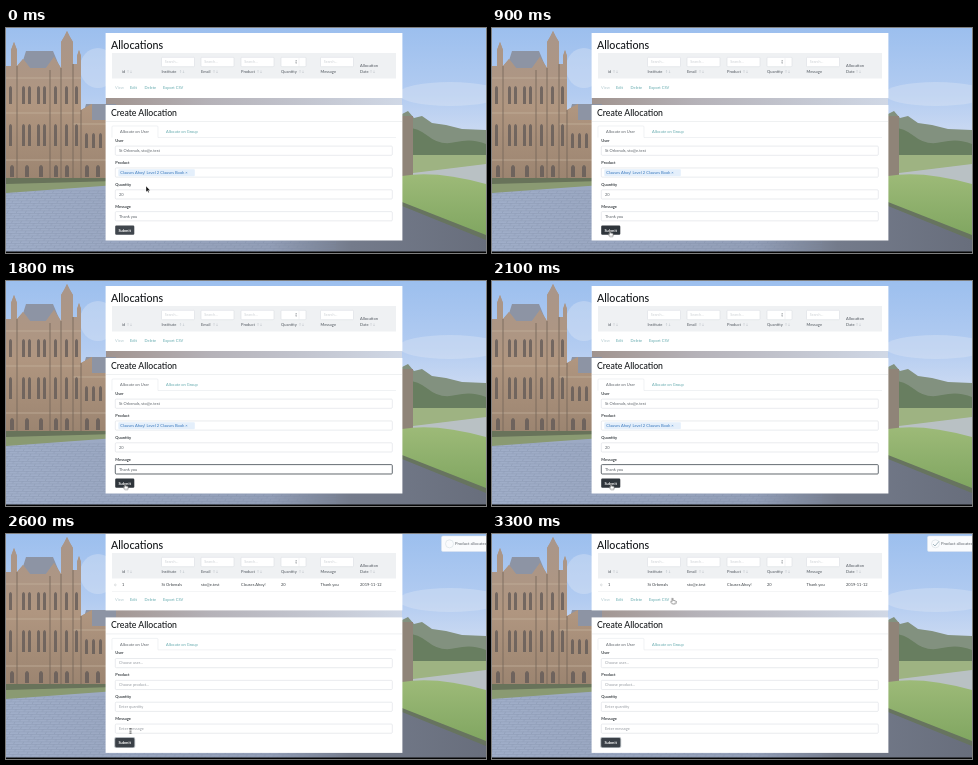
An HTML page for the animation above (3.4 s loop, 480 px wide and 225 px high).

```html
<!DOCTYPE html>
<html lang="en">
<head>
<meta charset="utf-8">
<title>Allocations</title>
<style>
  html, body { margin: 0; width: 100%; height: 100%; overflow: hidden; background: #000; }
  svg { display: block; width: 480px; height: 225px; }
  text { font: 4px Lato, "Open Sans", sans-serif; fill: #5d6369; }
  .title { font-size: 10.7px; font-weight: 500; fill: #16191c; }
  .subtitle { font-size: 8.7px; font-weight: 500; fill: #16191c; }
  .head { font-weight: 600; fill: #666c73; }
  .label { font-weight: 700; fill: #3b4045; }
  .hint { font-size: 3.9px; fill: #989da3; }
  .faint { font-size: 3.7px; fill: #cdd1d5; }
  .link { fill: #62a9ad; }
  .off { fill: #b5cbd0; }
  .row text { fill: #3b4045; }
  .field { fill: #fff; stroke: #dadee2; stroke-width: .6; }
  .anim { animation: 3.4s step-end infinite; }

  /* the new row pushes the form down while the page scrolls a little */
  .up { animation-name: up; }
  .down { animation-name: down; }
  .grow { animation-name: grow; }
  .late { animation-name: late; }
  .filled { animation-name: filled; }
  .empty, .glow { animation-name: empty; }
  .focus { animation-name: focus; }
  .hover { animation-name: hover; }
  .tick { stroke-dasharray: 9; animation-name: tick; }
  .cursor { animation-name: cursor; }
  .arrow { animation-name: arrow; }
  .hand { animation-name: hand; }
  .beam { animation-name: beam; }

  @keyframes up { 0% { transform: none; } 76.45%, 100% { transform: translateY(-6px); } }
  @keyframes down { 0% { transform: none; } 76.45%, 100% { transform: translateY(6.4px); } }
  @keyframes grow { 0% { height: 65px; } 76.45%, 100% { height: 77.4px; } }
  @keyframes late { 0% { visibility: hidden; } 76.45%, 100% { visibility: visible; } }
  @keyframes filled { 0% { visibility: visible; } 70.57%, 100% { visibility: hidden; } }
  @keyframes empty { 0% { visibility: hidden; } 70.57%, 100% { visibility: visible; } }
  @keyframes focus { 0% { visibility: hidden; } 49.98% { visibility: visible; } 70.57%, 100% { visibility: hidden; } }
  @keyframes hover { 0% { fill: #40464d; } 8.8% { fill: #2f353b; } 76.45%, 100% { fill: #3a4047; } }
  @keyframes tick {
    0% { stroke-dashoffset: 9; }
    76.45% { stroke-dashoffset: 9; animation-timing-function: steps(4); }
    88.22%, 100% { stroke-dashoffset: 0; }
  }
  @keyframes cursor {
    0% { transform: translate(140px, 158px); animation-timing-function: steps(3); }
    8.8% { transform: translate(119px, 197.5px); animation-timing-function: steps(2); }
    14.68% { transform: translate(118px, 202.5px); }
    49.98% { transform: translate(119px, 202.5px); }
    76.45% { transform: translate(124.5px, 197px); animation-timing-function: steps(4); }
    88.22% { transform: translate(140px, 157px); animation-timing-function: steps(3); }
    97.04%, 100% { transform: translate(180.5px, 64px); }
  }
  @keyframes arrow {
    0% { visibility: visible; } 5.86% { visibility: hidden; }
    79.39% { visibility: visible; } 97.04%, 100% { visibility: hidden; }
  }
  @keyframes hand {
    0% { visibility: hidden; } 8.8% { visibility: visible; }
    76.45% { visibility: hidden; } 97.04%, 100% { visibility: visible; }
  }
  @keyframes beam {
    0% { visibility: hidden; } 5.86% { visibility: visible; } 8.8% { visibility: hidden; }
    76.45% { visibility: visible; } 79.39%, 100% { visibility: hidden; }
  }
</style>
</head>
<body>
<svg viewBox="0 0 480 225">
  <defs>
    <linearGradient id="sky" x2="0" y2="1">
      <stop offset="0" stop-color="#9cbfee"/><stop offset=".3" stop-color="#b3ccf1"/><stop offset=".5" stop-color="#cfdcf2"/>
    </linearGradient>
    <linearGradient id="stone" x2="0" y2="1">
      <stop offset="0" stop-color="#a9968a"/><stop offset=".5" stop-color="#b09680"/><stop offset="1" stop-color="#9b8470"/>
    </linearGradient>
    <linearGradient id="wings">
      <stop offset="0" stop-color="#a0938e"/><stop offset=".35" stop-color="#b5b2b8"/><stop offset="1" stop-color="#d0d8e6"/>
    </linearGradient>
    <linearGradient id="lawn" x2="0" y2="1">
      <stop offset="0" stop-color="#9dba78"/><stop offset="1" stop-color="#7fa560"/>
    </linearGradient>
    <linearGradient id="path">
      <stop offset="0" stop-color="#a0aec9"/><stop offset=".55" stop-color="#939fb8"/><stop offset=".72" stop-color="#747b8b"/><stop offset="1" stop-color="#686e7c"/>
    </linearGradient>
    <pattern id="cobbles" width="9" height="5" patternUnits="userSpaceOnUse" patternTransform="skewX(-25)">
      <path d="M0 .4H9M2 0V2.5M0 2.9H9M6.5 2.5V5" stroke="#7886a0" stroke-width=".6" opacity=".45"/>
    </pattern>
    <pattern id="courses" width="7" height="4" patternUnits="userSpaceOnUse">
      <path d="M0 .5H7M2 0V2M5 2V4" stroke="#6d5946" stroke-width=".5" opacity=".25"/>
    </pattern>
  </defs>

  <rect width="480" height="225" fill="url(#sky)"/>
  <g fill="#e3eaf6" opacity=".35">
    <ellipse cx="444" cy="66" rx="52" ry="12"/><ellipse cx="92" cy="40" rx="18" ry="20"/>
  </g>

  <!-- hall -->
  <rect x="100" y="69" width="296" height="16" fill="url(#wings)"/>
  <path d="M14 42L20 23H47L55 42ZM74 98L80 76H110V98Z" fill="#8d94a4"/>
  <path id="hall" d="M0 38H5V22L8 14L11 22V38L17 31L24 40H40L48 29L55 40V14L58 9L61 3L64 9L67 14V36H71V28L73 22L75 28V82L86 76V92H110V153H0Z" fill="url(#stone)"/>
  <use href="#hall" style="fill:url(#courses)"/>
  <path d="M0 50H75M0 85H75M67 96H110M0 132H110" stroke="#c2b09a" stroke-width="1.2" opacity=".8"/>
  <path d="M11 38V152M44 42V152M55 40V152M67 36V152M75 82V152" stroke="#75665a" stroke-width="1.4" opacity=".6"/>
  <g id="windows" fill="#5f5856" opacity=".75"/>

  <!-- grounds -->
  <rect y="150" width="480" height="75" fill="url(#path)"/>
  <rect y="162" width="330" height="63" fill="url(#cobbles)"/>
  <path d="M0 150H110V157L0 165Z" fill="#8a9a72"/>
  <path d="M0 150H110V153L0 156Z" fill="#68735a"/>
  <rect x="396" y="118" width="84" height="42" fill="#b9c1c4"/>
  <path d="M396 86L402 83L408 90L416 88L426 95L440 97L456 101L480 102V126H396Z" fill="#82917f"/>
  <path d="M396 100Q410 98 422 108T450 114T480 116V128H396Z" fill="#687e60"/>
  <path d="M396 88H407V148H396Z" fill="#8f8478"/>
  <path d="M407 127H480V136L407 145Z" fill="#9eb382"/>
  <path d="M396 148Q430 142 480 156V210L396 176Z" fill="url(#lawn)"/>
  <path d="M396 174L480 207V212L396 178Z" fill="#67745f"/>
  <rect y="223.5" width="480" height="1.5" fill="#050505"/>

  <!-- table panel -->
  <g class="anim up">
    <rect class="anim grow" x="99.6" y="5" width="296.8" height="65" fill="#fff"/>
    <text class="title" x="105" y="20.6">Allocations</text>
    <rect x="106" y="25" width="284" height="25.5" fill="#eff1f3"/>
    <g id="heads"></g>
  </g>
  <g class="anim late row" id="row"></g>
  <g class="anim down">
    <text class="link off" x="109" y="60.6">View</text>
    <text class="link" x="124" y="60.6">Edit</text>
    <text class="link" x="138.5" y="60.6">Delete</text>
    <text class="link" x="157" y="60.6">Export CSV</text>

    <!-- form panel -->
    <rect x="99.6" y="77" width="296.8" height="135.5" fill="#fff"/>
    <text class="subtitle" x="105" y="87.6">Create Allocation</text>
    <path d="M100 93.5H396" stroke="#e8ebed" stroke-width=".7"/>
    <path d="M106 109.5V99Q106 98 107 98H151Q152 98 152 99V109.5H390" fill="none" stroke="#e6e9ec" stroke-width=".6"/>
    <text x="114" y="105.3">Allocate on User</text>
    <text class="link" x="160" y="105.3">Allocate on Group</text>
    <g id="fields"></g>
    <rect class="anim focus" x="109.3" y="183.6" width="277" height="9.4" rx="1" fill="none" stroke="#5c6268" stroke-width=".9"/>
    <rect class="anim glow" x="108.3" y="196.7" width="20.9" height="11" rx="1.8" fill="#b3b8bd"/>
    <rect class="anim hover" x="109.2" y="197.6" width="19.1" height="9.2" rx="1.1"/>
    <text x="112.4" y="203.7" style="fill:#fff;font-weight:700">Submit</text>
  </g>

  <!-- toast -->
  <g class="anim late">
    <rect x="435.5" y="2" width="50" height="15.5" rx="1.5" fill="#fafbfd" stroke="#dfe5ee" stroke-width=".5"/>
    <circle cx="443.5" cy="9.8" r="4" fill="none" stroke="#d9e1e5" stroke-width=".7"/>
    <path class="anim tick" d="M441 10L443 12L447 7.4" fill="none" stroke="#93a9b3" stroke-width=".8"/>
    <text x="449" y="11.3" style="font-size:4.2px">Product allocated</text>
  </g>

  <g class="anim cursor" stroke-linejoin="round">
    <path class="anim arrow" d="M0 0V6L1.4 4.8L2.3 6.7L3.2 6.3L2.4 4.4H4.2Z" fill="#111" stroke="#fff" stroke-width=".4"/>
    <path class="anim hand" d="M-.6 .4Q0 -.4 .5 .4V2.3L3 2.9Q3.5 3.1 3.3 4L2.8 6H-.2L-1.9 3.8Q-1.6 3 -.6 3.7Z" fill="#fff" stroke="#3c3c3c" stroke-width=".5"/>
    <path class="anim beam" d="M-1.2 -2.7Q0 -2.7 0 -2Q0 -2.7 1.2 -2.7M0 -2V2M-1.2 2.7Q0 2.7 0 2Q0 2.7 1.2 2.7M-.6 .8H.6" fill="none" stroke="#333" stroke-width=".6"/>
  </g>
</svg>

<script>
  const put = (id, markup) => { document.getElementById(id).innerHTML += markup; };
  const text = (x, y, words, kind = "") => `<text class="${kind}" x="${x}" y="${y}">${words}</text>`;
  const sorter = (x, y) =>
    `<path d="M${x} ${y}v-2.6m-.7 .8l.7 -.8l.7 .8M${x + 3} ${y - 2.6}v2.6m-.7 -.8l.7 .8l.7 -.8" fill="none" stroke="#bcc2c7" stroke-width=".4"/>`;

  // name, left edge, sorter offset, search box width, value in the new row
  const columns = [
    ["id", 116, 6, 0, "1"],
    ["Institute", 155.5, 19, 33, "St Orbenals"],
    ["Email", 195, 13, 33, "sto@e.test"],
    ["Product", 235, 17, 33, "Clauses Ahoy!"],
    ["Quantity", 275, 19, 25, "20"],
    ["Message", 314.5, 0, 33, "Thank you"],
    ["Date", 354, 11, 0, "2019-11-12"]
  ];
  for (const [name, x, sort, box, value] of columns) {
    put("heads", text(x, 45.2, name, "head") + (sort ? sorter(x + sort, 45) : ""));
    if (box) {
      put("heads", `<rect class="field" x="${x}" y="29.3" width="${box}" height="9.4" rx=".8"/>`);
      if (name !== "Quantity") put("heads", text(x + 3.3, 35.2, "Search...", "faint"));
    }
    put("row", text(x, 52.3, value));
  }
  put("heads", text(354, 39.3, "Allocation", "head") +
    `<path d="M289.3 33.3l.8 -1.2l.8 1.2zM289.3 34.5l.8 1.2l.8 -1.2z" fill="#5f656b"/>
     <path d="M293 30V38.2" stroke="#e4e7ea" stroke-width=".5"/>`);
  put("row", `<path d="M106 57.5H390" stroke="#e8ebed" stroke-width=".5"/>
    <circle cx="109.3" cy="50.9" r=".9" fill="none" stroke="#b3b9be" stroke-width=".4"/>`);

  const fields = [
    ["User", "St Orbenals, sto@e.test", "Choose user..."],
    ["Product", "Clauses Ahoy! Level 2 Clauses Book", "Choose product..."],
    ["Quantity", "20", "Enter quantity"],
    ["Message", "Thank you", "Enter message"]
  ];
  fields.forEach(([name, value, hint], i) => {
    const y = 118.1 + i * 21.85;
    const chip = name === "Product";
    const filled = chip
      ? `<rect x="112.3" y="${y + 1.3}" width="76.5" height="6.9" rx=".8" fill="#e4effb"/>` +
        `<text x="114.3" y="${y + 6}" style="font-size:4.1px;fill:#3878bd">${value} ×</text>`
      : text(113, y + 6, value);
    put("fields", text(109.3, y - 4, name, "label") +
      `<rect class="field" x="109.3" y="${y}" width="277" height="9.2" rx="1"/>
       <g class="anim filled">${filled}</g>
       <g class="anim empty">${text(113, y + 6, hint, "hint")}</g>`);
  });

  // arched windows: left edge, top, width, height
  const arch = (x, y, w, h) => `<path d="M${x} ${y + h}V${y + w / 2}Q${x + w / 2} ${y - w / 2} ${x + w} ${y + w / 2}V${y + h}Z"/>`;
  for (const [y, h] of [[58, 18], [96, 22]]) {
    for (const x of [3, 16, 22, 31, 37, 48, 59, 69]) put("windows", arch(x, y, 3, h));
  }
  for (const x of [4, 19, 33, 48, 59, 79, 90]) put("windows", arch(x, 137, 4, 12));
  for (const x of [79, 86, 93]) put("windows", arch(x, 105, 3, 15));
</script>
</body>
</html>
```
